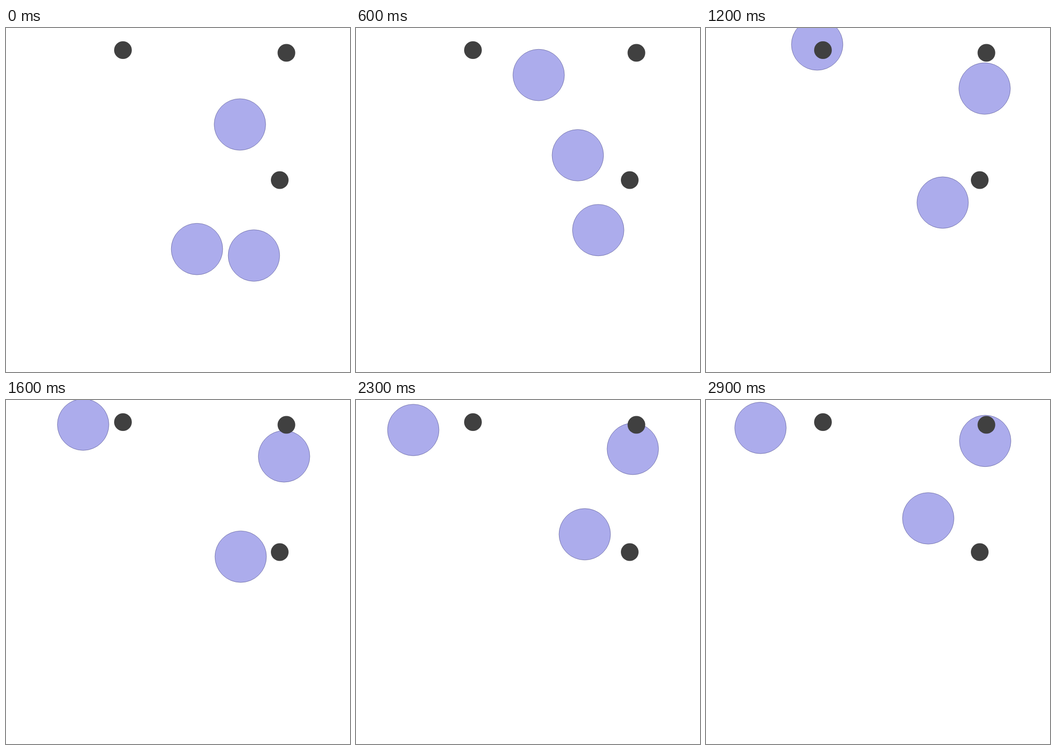
Animation, 700 px wide and 700 px high, one loop 3000 ms. Source, as an HTML page with a canvas:

```html
<!DOCTYPE html>
<html>
<head>
<meta charset="utf-8">
<style>
html, body { margin: 0; overflow: hidden; background: #fff; }
canvas { display: block; }
</style>
</head>
<body>
<canvas width="700" height="700"></canvas>
<script>
const ctx = document.querySelector('canvas').getContext('2d');
const STEP = 100, STEPS = 30;  // ms per step, steps per loop
const PHASE = 4;               // steps before an agent changes its drift
const FRICTION = 0.25;         // share of the speed difference made up per step

const landmarks = [[238, 45], [570.6, 50.5], [557, 309.5]];

// Agents start at rest; each drift is the velocity aimed for, and the last one stays
const agents = [
  { start: [476, 196.3], drifts: [[-29.5, -31], [-29.5, -18], [-20, 7.8], [-12.3, 9.2], [-0.1, -1.1]] },
  { start: [388.6, 449.8], drifts: [[11.3, -57.7], [44.5, -38.7], [-7, 11.3], [-6.5, 0.5], [1, -2.8]] },
  { start: [504.5, 463], drifts: [[-3.6, -16.4], [-2, -7.3], [-1.3, -10.8], [-0.4, -8.1], [-2.3, -5.2]] }
];

function position({ start, drifts }, steps) {
  let [x, y] = start, vx = 0, vy = 0;
  for (let i = 0; i < steps; i++) {
    const phase = Math.min(Math.floor(i / PHASE), drifts.length - 1);
    const [driftX, driftY] = drifts[phase];
    x += vx += (driftX - vx) * FRICTION;
    y += vy += (driftY - vy) * FRICTION;
  }
  return [x, y];
}

function disc([x, y], radius, fill) {
  ctx.beginPath();
  ctx.arc(x, y, radius, 0, 2 * Math.PI);
  ctx.fillStyle = fill;
  ctx.fill();
}

function draw(time) {
  const steps = Math.floor(time / STEP) % STEPS;
  ctx.clearRect(0, 0, 700, 700);
  ctx.strokeStyle = 'rgba(45, 45, 108, 0.5)';
  for (const agent of agents) {
    disc(position(agent, steps), 52.4, '#acacec');
    ctx.stroke();
  }
  for (const landmark of landmarks) disc(landmark, 18, '#404040');
}

const startTime = performance.now();
function tick() {
  draw(performance.now() - startTime);
  requestAnimationFrame(tick);
}
tick();
</script>
</body>
</html>
```
